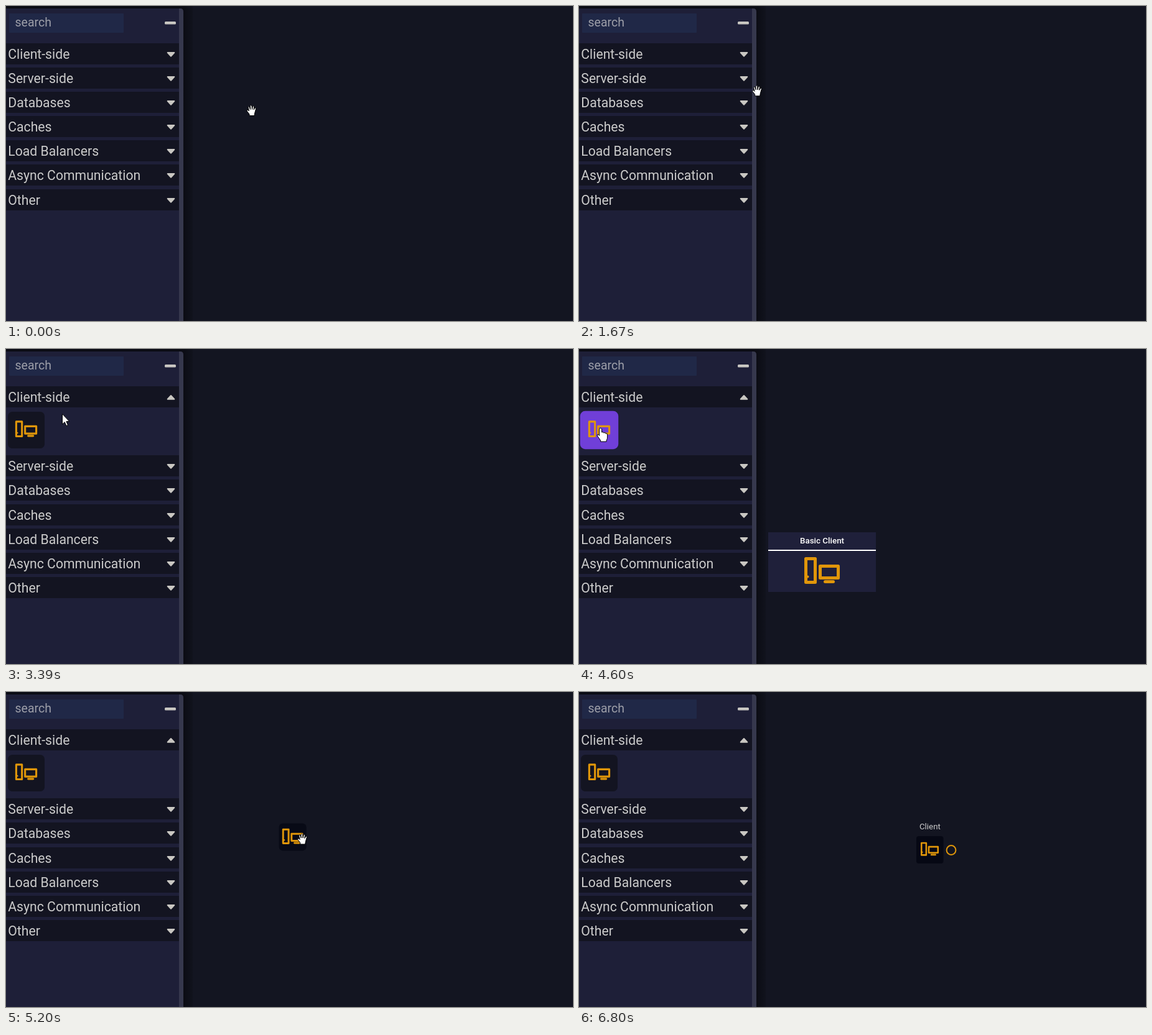
An HTML page for the animation above (7770 ms loop, 911 px wide and 507 px high).

```html
<!DOCTYPE html>
<html lang="en">
<head>
<meta charset="utf-8">
<title>Drag a component</title>
<style>
html, body { margin: 0; width: 100%; height: 100%; overflow: hidden; background: #131521; cursor: none; }
svg { display: block; width: 911px; height: 507px; font-family: Roboto, sans-serif; }
.row rect { fill: #131421; }
.row text { font-size: 21.2px; fill: #cbcbcb; }
.row path { fill: #c9c7c2; stroke: #c9c7c2; stroke-width: 2; stroke-linejoin: round; }
#cursor path { fill: #fff; stroke: #000; stroke-linejoin: round; }
</style>
</head>
<body>
<svg viewBox="0 0 911 507">
  <defs>
    <linearGradient id="shade"><stop offset=".95" stop-color="#0b0c14"/><stop offset="1" stop-color="#11131d"/></linearGradient>
    <g id="icon" fill="none" stroke="#e0960a" stroke-width="5" stroke-linejoin="round">
      <rect x="-26" y="-19" width="15" height="38"/>
      <rect x="-3" y="-7" width="29" height="19"/>
      <path d="M5 18H18" stroke-linecap="round"/>
      <circle cx="-23" cy="10" r="2" fill="#e0960a" stroke="none"/>
    </g>
  </defs>
  <rect width="911" height="507" fill="#131521"/>
  <rect width="300" height="507" fill="url(#shade)"/>
  <path d="M0 4H280Q285 4 285 9V507H0Z" fill="#36384d"/>
  <rect y="4" width="278" height="503" fill="#1e1f38"/>
  <rect x="5" y="12" width="184" height="31" rx="1" fill="#202847"/>
  <text x="14.5" y="33" font-size="19.5" fill="#9c9ea8">search</text>
  <rect x="255" y="25" width="18" height="4.5" rx="1.5" fill="#c9c7c2"/>
  <g id="rows"></g>
  <g id="tile">
    <rect id="tileBox" x="3" y="101" width="59" height="59" rx="7"/>
    <use href="#icon" transform="translate(32.5 128.7) scale(.62)"/>
  </g>
  <g id="tip">
    <rect x="304" y="295" width="173" height="96" fill="#1f203a"/>
    <rect x="304" y="323" width="173" height="2" fill="#fff"/>
    <text x="390.5" y="313" text-anchor="middle" font-size="13.4" font-weight="500" fill="#fff">Basic Client</text>
    <use href="#icon" transform="translate(390.5 356.5)"/>
  </g>
  <g id="ghost">
    <rect x="-22" y="-22" width="44" height="44" rx="6" fill="#080a16"/>
    <use href="#icon" transform="translate(0 -1) scale(.59)"/>
  </g>
  <g id="node">
    <text x="563.9" y="221" text-anchor="middle" font-size="13.33" fill="#cbcbcb">Client</text>
    <rect x="542" y="232" width="43.5" height="44" rx="4" fill="#060814"/>
    <use href="#icon" transform="translate(563.5 252.7) scale(.51)"/>
    <circle cx="598" cy="254.5" r="7.4" fill="none" stroke="#e0960a" stroke-width="2"/>
  </g>
  <g id="cursor"><path/></g>
</svg>
<script>
const LOOP = 7770, OPEN = 2840, TIP = 3780, DRAG = 4630, DROP = 5920;
const $ = id => document.getElementById(id);
const names = ["Client-side", "Server-side", "Databases", "Caches", "Load Balancers", "Async Communication", "Other"];
const shapes = {
  arrow: "M0 0V16.5L3.8 13 6.4 19 9 17.9 6.4 12H11.3Z",
  pointer: "M-2 1.5Q0-1 2 1.5V7Q4.5 5.5 5 8 7.8 6.5 8.2 9 11 8 11 11V15Q11 18 9.5 20V22H0V20L-5 13Q-6 10-3.5 10.5L-2 12.5Z",
  hand: "M-3 8.5V6L-7 1Q-7.5-1.5-5-.5L-3.5 1-5-5Q-4.5-7.5-2.8-5.5L-1.5-1.5-1.7-7Q-.3-9.5 1-7L1.3-1.5 2.5-6.5Q4-8 4.7-6L4-1 5.5-3.5Q7-5 7.7-3L5.5 5 5 8.5Z",
  move: "M0-11L4.5-6H1.5V-1.5H6V-4.5L11 0 6 4.5V1.5H1.5V6H4.5L0 11-4.5 6H-1.5V1.5H-6V4.5L-11 0-6-4.5V-1.5H-1.5V-6H-4.5Z"
};

const linear = u => u;
const easeIn = u => u ** 1.3;
const easeOut = u => 1 - (1 - u) ** 1.3;
const home = [394, 168];
const moves = [
  { from: 1070, to: 1830, end: [257, 128], ease: linear },
  { from: 1860, to: 2190, end: [156, 86], ease: linear },
  { from: 2340, to: 2430, end: [147, 82], ease: linear },
  { from: 3180, to: 3600, end: [34.5, 127], ease: linear },
  { from: 4600, to: 4870, end: [203.8, 180.7], ease: easeIn },
  { from: 4870, to: 5370, end: [563.5, 254.5], ease: easeOut },
  { from: 6410, to: 6800, end: [890, 530], ease: easeIn }
];

const at = t => moves.reduce((pos, { from, to, end, ease }) => {
  const u = ease(Math.min(1, Math.max(0, (t - from) / (to - from))));
  return pos.map((p, i) => p + (end[i] - p) * u);
}, home);

$("rows").innerHTML = names.map(name =>
  `<g class="row"><rect y="60" width="278" height="34"/><text x="3.3" y="85">${name}</text><path/></g>`).join("");
const rows = [...document.querySelectorAll(".row")];

const show = (id, on) => $(id).setAttribute("visibility", on ? "visible" : "hidden");
const place = (el, x, y) => el.setAttribute("transform", `translate(${x} ${y})`);

function draw(t) {
  const [x, y] = at(t);
  const open = t >= OPEN;
  rows.forEach((row, i) => {
    place(row, 0, Math.floor(i * 39.17 + (open && i ? 72.6 : 0)));
    row.lastChild.setAttribute("d", open && !i ? "M259.7 80.7H270.3L265 75Z" : "M259.7 75H270.3L265 80.7Z");
  });

  const hover = open && x < 62 && y > 101;
  $("tileBox").setAttribute("fill", hover ? "#703fd8" : "#131421");
  $("tileBox").setAttribute("stroke", hover ? "#703fd8" : "none");
  $("tileBox").setAttribute("stroke-width", 2.5);
  show("tile", open);
  show("tip", t >= TIP && t < DRAG);

  // the dragged copy trails slightly behind the pointer
  show("ghost", t >= DRAG && t < DROP);
  place($("ghost"), ...at(t - 22));
  show("node", t >= DROP);

  const onNode = t >= DROP && x < 586 && y < 276;
  const kind = onNode ? "move" : x > 285 ? "hand" : hover ? "pointer" : "arrow";
  $("cursor").firstChild.setAttribute("d", shapes[kind]);
  place($("cursor"), x, y);
}

const start = performance.now();
function tick() {
  draw((performance.now() - start) % LOOP);
  requestAnimationFrame(tick);
}
tick();
</script>
</body>
</html>
```
